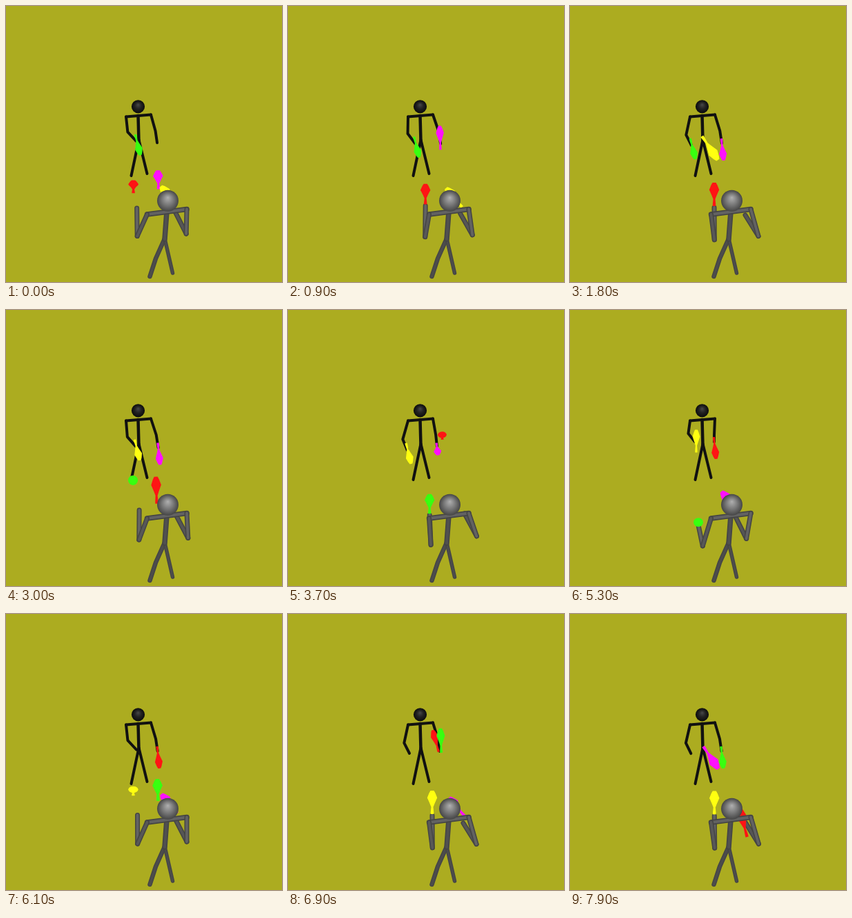
An HTML page with a canvas for the animation above (8 s loop, 400 px wide and 400 px high).

```html
<!DOCTYPE html>
<html lang="en">
<head>
<meta charset="utf-8">
<title>Club passing</title>
<style>
html, body { margin: 0; width: 100%; height: 100%; overflow: hidden; background: #acac20; }
canvas { display: block; width: 400px; height: 400px; }
</style>
</head>
<body>
<canvas id="stage" width="400" height="400"></canvas>
<script>
const ctx = document.getElementById('stage').getContext('2d');
const LOOP = 8000, STEP = 100;
const BEAT = 1020;            // one swing of every hand
const LEAD = 240;             // swing phase at time zero
const GAP = 3 * BEAT;         // delay between one club and the next
const CIRCUIT = 5 * GAP;      // a club visits all four hands
const CLUB = 46, TAU = 2 * Math.PI;

const mod = (a, n) => ((a % n) + n) % n;
const lerp = (a, b, u) => a + (b - a) * u;
const mix = (a, b, u) => a.map((v, i) => lerp(v, b[i], u));
const ease = u => { u = Math.max(0, Math.min(1, u)); return u * u * (3 - 2 * u); };

// Closed path through five points, reached at these phases of a swing
const PHASES = [0, 210, 440, 560, 800, BEAT];

function along(points, t) {
  const p = mod(t + LEAD, BEAT), n = points.length;
  let i = 0;
  while (PHASES[i + 1] <= p) i++;
  const u = (p - PHASES[i]) / (PHASES[i + 1] - PHASES[i]);
  const [a, b, c, d] = [-1, 0, 1, 2].map(k => points[mod(i + k, n)]);
  return [0, 1].map(k => b[k] + u / 2 * (c[k] - a[k] +
    u * (2 * a[k] - 5 * b[k] + 4 * c[k] - d[k] + u * (3 * (b[k] - c[k]) + d[k] - a[k]))));
}

// Each hand: its path, the elbow that follows it, and the grip (dx, dy, length, angle, scale)
const hands = {
  frontL: {
    path: [[209, 292], [191, 291], [186, 312], [190, 303], [201, 300]],
    elbow: (x, y) => [x + .3 * (y - 291), 332 + .3 * (x - 188) + .5 * (y - 291)],
    grip: t => {
      const len = 18 + 16 * Math.cos(TAU * (t + LEAD) / BEAT);
      return [0, -2 - len / 2, len, 0, 1];
    }
  },
  frontR: {
    path: [[254, 303], [246, 298], [240, 300], [255, 286], [256, 290]],
    elbow: (x, y) => [260 + 1.2 * (x - 244) + .2 * (y - 298), 330 + .7 * (y - 298)],
    grip: () => [-9, -23, 36, -40, 1]
  },
  backL: {
    path: [[176, 202], [189, 197], [181, 191], [172, 203], [172, 203]],
    elbow: (x, y) => [177 + .62 * (x - 190), 184 + .7 * (y - 198)],
    grip: () => [2, 5, -31, -14, .77]
  },
  backR: {
    path: [[220, 199], [220, 199], [209, 191], [205, 191], [213, 196]],
    elbow: x => [206 + .75 * (x - 205), 181],
    grip: () => [1, 9, -32, -6, .77]
  }
};

// The four passes of a circuit; curve is a cubic Bezier
const passes = [
  { start: 0, time: 1200, to: 'backR', turns: 1.2, angle: -2, scale: [1, .75],
    curve: [[209, 283], [240, 222], [220, 144], [220, 203]] },
  { start: 4080, time: 960, to: 'frontR', turns: 1, angle: -15, scale: [.75, 1],
    curve: [[214, 184], [238, 165], [254, 222], [251, 302]] },
  { start: 7600, time: 1300, to: 'backL', turns: 1.2, angle: -34, scale: [1, .75],
    curve: [[231, 277], [215, 215], [169, 138], [178, 210]] },
  { start: 11660, time: 900, to: 'frontL', turns: 1, angle: 0, scale: [.75, 1],
    curve: [[183, 190], [182, 150], [182, 208], [186, 295]] }
];

// In the order they set off
const colors = ['#ff10ff', '#ff1414', '#38ff10', '#ffff10'];

const handAt = (name, t) => along(hands[name].path, t);

function flying({ curve, turns, angle, scale }, u) {
  let pts = curve;
  while (pts.length > 1) pts = pts.slice(1).map((p, i) => mix(pts[i], p, u));
  const s = lerp(scale[0], scale[1], u) + .1 * Math.sin(Math.PI * u);
  return [...pts[0], CLUB * s * Math.cos(TAU * (turns * u - .05)), angle, s];
}

function clubPose(i, t) {
  const age = mod(t + 200 - GAP * i, CIRCUIT);
  const k = passes.findLastIndex(p => p.start <= age);
  const pass = passes[k], held = age - pass.start - pass.time;
  if (held < 0) return flying(pass, 1 + held / pass.time);
  const next = passes[(k + 1) % 4];
  const wait = mod(next.start - age, CIRCUIT);
  const [x, y] = handAt(pass.to, t);
  const [dx, dy, ...rest] = hands[pass.to].grip(t);
  const pose = mix(flying(pass, 1), [x + dx, y + dy, ...rest], ease(held / 200));
  return mix(pose, flying(next, 0), ease(1.2 - wait / 200));
}

function line(color, width, ...pts) {
  ctx.strokeStyle = color;
  ctx.lineWidth = width;
  ctx.beginPath();
  for (const [x, y] of pts) ctx.lineTo(x, y);
  ctx.stroke();
}

function limb(width, light, ...pts) {
  line('#454545', width, ...pts);
  line(light, width * .55, ...pts);
}

function ball(x, y, r, ...shades) {
  const g = ctx.createRadialGradient(x, y - r * .3, 0, x, y, r);
  shades.forEach((c, i) => g.addColorStop(i / (shades.length - 1), c));
  ctx.fillStyle = g;
  ctx.beginPath();
  ctx.arc(x, y, r, 0, TAU);
  ctx.fill();
}

// Club outline from knob to tip: position, half width
const outline = [[0, 2.2], [.08, 2.2], [.3, 1.5], [.45, 3.5], [.7, 7.2], [.9, 4.5], [1, 2.5]];

function drawClub(color, [x, y, len, angle, scale]) {
  const at = p => len * (.5 - p);
  ctx.save();
  ctx.translate(x, y);
  ctx.rotate(angle * Math.PI / 180);
  ctx.fillStyle = color;
  ctx.beginPath();
  for (const [p, w] of outline) ctx.lineTo(w * scale, at(p));
  for (const [p, w] of [...outline].reverse()) ctx.lineTo(-w * scale, at(p));
  ctx.fill();
  // seen end-on, the body is round
  const r = 7 * scale;
  ctx.beginPath();
  ctx.ellipse(0, at(.68), r, r * Math.max(0, 1 - Math.abs(len) / (40 * scale)), 0, 0, TAU);
  ctx.fill();
  ctx.restore();
}

function draw(t) {
  ctx.fillStyle = '#acac20';
  ctx.fillRect(0, 0, 400, 400);
  ctx.lineCap = ctx.lineJoin = 'round';

  const arm = (name, shoulder) => {
    const hand = handAt(name, t);
    return [shoulder, hands[name].elbow(...hand), hand];
  };

  const dark = '#111';
  line(dark, 4, [181.5, 246], [192.5, 194], [204.5, 243]);
  line(dark, 4.5, [191.5, 159], [192.5, 196]);
  line(dark, 4, [174, 160.5], [210, 157.5]);
  line(dark, 4, ...arm('backL', [174, 160.5]));
  line(dark, 4, ...arm('backR', [210, 157.5]));
  ball(191.5, 145.8, 9.6, '#484848', '#222', '#0c0c0c');

  const left = arm('frontL', [204.5, 302]), right = arm('frontR', [262, 294.5]);
  limb(7, '#636363', ...left.slice(1));
  limb(7, '#565656', ...right.slice(1));
  colors.forEach((c, i) => drawClub(c, clubPose(i, t)));

  limb(6.5, '#4c4c4c', [230, 337], [217, 366], [208.5, 392]);
  limb(5.5, '#4c4c4c', [230, 337], [241.5, 387]);
  limb(7.5, '#505050', [233, 298], [230, 338]);
  limb(7.5, '#626262', left[0], right[0]);
  limb(7, '#585858', ...left.slice(0, 2));
  limb(7, '#626262', ...right.slice(0, 2));
  ball(234.5, 282.3, 15.5, '#b0b0b0', '#7c7c7c', '#464646');
}

const begin = performance.now();
function tick() {
  const t = (performance.now() - begin) % LOOP;
  draw(Math.floor(t / STEP) * STEP);
  requestAnimationFrame(tick);
}
tick();
</script>
</body>
</html>
```
